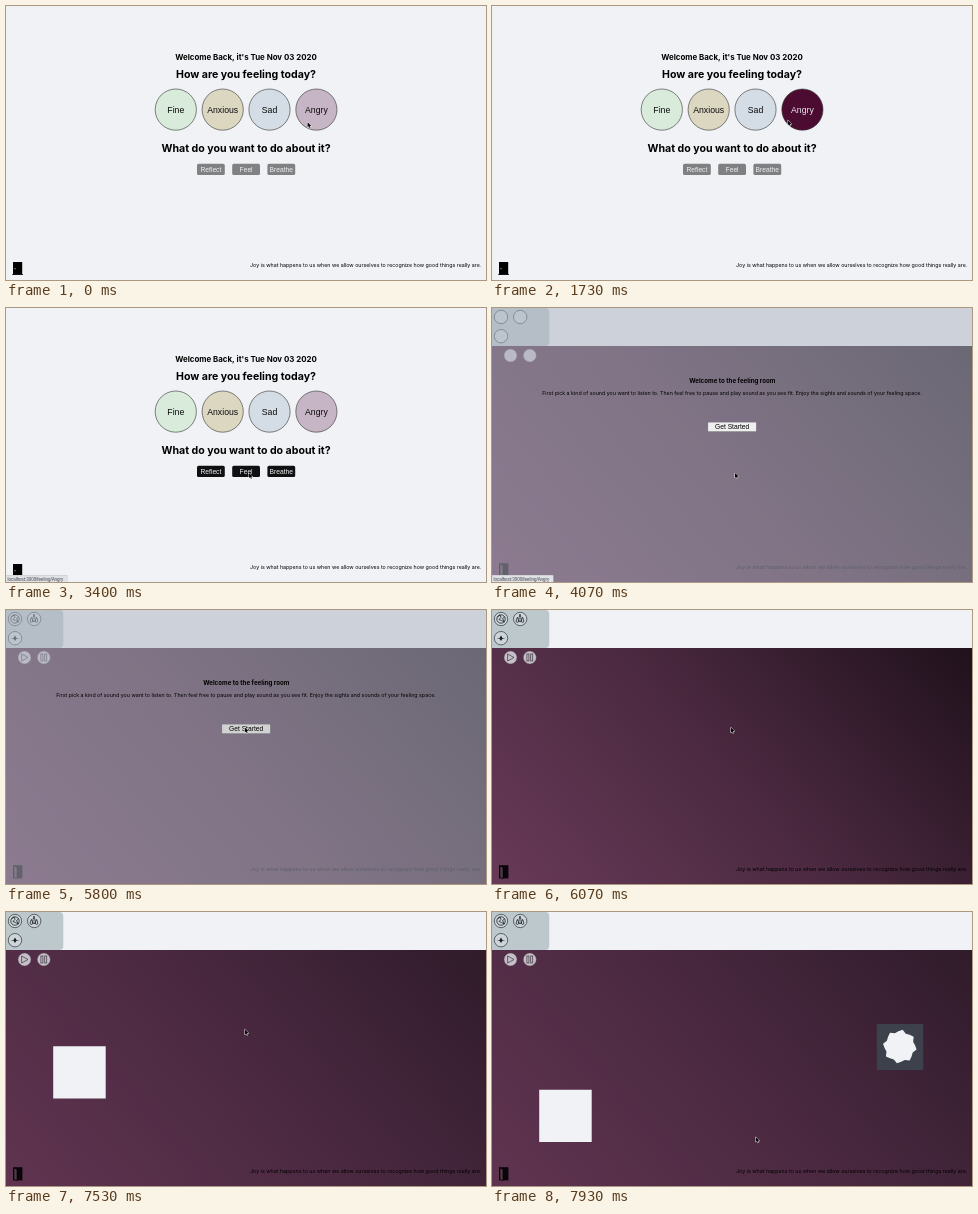
Animation, 480 px wide and 274 px high, one loop 8000 ms. Source, as an HTML page with a canvas:

```html
<!DOCTYPE html>
<html lang="en">
<head>
<meta charset="utf-8">
<title>Feeling room</title>
<style>
html, body { margin: 0; width: 100%; height: 100%; overflow: hidden; background: #f0f2f6; }
canvas { display: block; }
</style>
</head>
<body>
<canvas id="stage" width="480" height="274"></canvas>
<script>
const c = document.getElementById('stage').getContext('2d');
const LOOP = 8000;
const SANS = 'Inter, sans-serif';
const ARIAL = '"Liberation Sans", Arial, sans-serif';
const PAPER = '#f0f2f6';

const clamp = v => Math.max(0, Math.min(1, v));
const ramp = (t, a, b) => clamp((t - a) / (b - a));
const ease = p => p * p * (3 - 2 * p);
const lerp = (a, b, p) => a + (b - a) * p;
const mix = (a, b, p) => `rgb(${a.map((v, i) => Math.round(lerp(v, b[i], p)))})`;

function rect(x, y, w, h, fill, r = 0) {
  c.fillStyle = fill;
  c.beginPath();
  c.roundRect(x, y, w, h, r);
  c.fill();
}

function disc(x, y, r, fill, line, width) {
  c.beginPath();
  c.arc(x, y, r, 0, Math.PI * 2);
  c.fillStyle = fill;
  c.fill();
  c.strokeStyle = line;
  c.lineWidth = width;
  c.stroke();
}

function path(points, closed) {
  c.beginPath();
  points.forEach(([x, y]) => c.lineTo(x, y));
  if (closed) c.closePath();
}

function label(str, x, y, font, fill = '#000', align = 'center') {
  c.font = font;
  c.fillStyle = fill;
  c.textAlign = align;
  c.fillText(str, x, y);
}

// Cursor stops: start, end, x, y
const moves = [
  [70, 530, 295.8, 114.3],
  [2130, 2930, 243, 165],
  [4400, 5200, 238.8, 117.5],
  [7600, 7930, 263.8, 225]
];

function cursor(t) {
  let x = 301.6, y = 116.3;
  for (const [a, b, nx, ny] of moves) {
    const p = ease(ramp(t, a, b));
    x = lerp(x, nx, p);
    y = lerp(y, ny, p);
  }
  c.save();
  c.translate(x, y);
  path([[0, 0], [0, 5], [1.2, 4], [2, 5.8], [2.9, 5.4], [2.1, 3.7], [3.7, 3.6]], true);
  c.lineWidth = 0.9;
  c.strokeStyle = '#fff';
  c.stroke();
  c.fillStyle = '#000';
  c.fill();
  c.restore();
}

function quote() {
  label('Joy is what happens to us when we allow ourselves to recognize how good things really are.',
    475.3, 261, `5.3px ${SANS}`, '#000', 'right');
}

function status() {
  rect(-2, 267, 63.5, 9, '#c3c6ca', 1);
  rect(-2, 267.5, 63, 9, '#dfe2e6', 1);
  label('localhost:3000/feeling/Angry', 1.5, 272.7, `4.45px ${ARIAL}`, '#444', 'left');
}

function home(t) {
  rect(0, 0, 480, 274, PAPER);
  label("Welcome Back, it's Tue Nov 03 2020", 240, 54.2, `bold 7.9px ${SANS}`);
  label('How are you feeling today?', 240, 72.2, `bold 10.6px ${SANS}`);
  label('What do you want to do about it?', 240, 146.2, `bold 10.6px ${SANS}`);

  const angry = t < 1700 ? 0 : 1 - ramp(t, 3050, 3350);
  const moods = [
    ['Fine', 169.8, '#d9ebdb'],
    ['Anxious', 216.7, '#dcd7c1'],
    ['Sad', 263.5, '#d4dde5'],
    ['Angry', 310.4, mix([198, 181, 197], [76, 12, 50], angry)]
  ];
  moods.forEach(([name, x, fill], i) => {
    disc(x, 103.6, 20.6, fill, '#333', 0.6);
    label(name, x, 106.7, `8.7px ${ARIAL}`, i === 3 ? mix([10, 10, 10], [235, 230, 235], angry) : '#0a0a0a');
  });

  const on = ramp(t, 1730, 1930);
  ['Reflect', 'Feel', 'Breathe'].forEach((name, i) => {
    const x = 191 + i * 35.2;
    rect(x, 157.8, 27.8, 11.2, mix([128, 129, 131], [14, 16, 17], on), 1.6);
    label(name, x + 13.9, 165.8, `6.7px ${ARIAL}`, '#f0f0f0');
  });

  rect(7, 256, 9.2, 12.6, '#000');
  rect(6.2, 268.2, 10.8, 0.8, '#000');
  rect(8.5, 262.3, 1, 1, '#ddd');
  quote();
}

function icons() {
  c.strokeStyle = '#1c2226';
  c.fillStyle = '#1c2226';
  c.lineWidth = 0.8;
  // globe
  c.beginPath();
  c.arc(9, 9, 4.2, 0, 7);
  c.stroke();
  path([[5.4, 7], [8, 5], [9, 7.4], [7, 9.5], [9.5, 10.5], [12.5, 12], [10.5, 8.5], [12.6, 7]]);
  c.stroke();
  // drops
  for (const [x, y, h] of [[25.4, 12.4, 5], [28, 11.8, 7.6], [30.6, 12.4, 5]]) {
    c.beginPath();
    c.moveTo(x, y - h);
    c.quadraticCurveTo(x + 2.4, y, x, y);
    c.quadraticCurveTo(x - 2.4, y, x, y - h);
    c.stroke();
  }
  // wave
  path([[4.5, 28.3], [7.5, 28], [9, 25.6], [10.5, 28], [13.5, 28.3], [10.5, 28.8], [9, 31], [7.5, 28.8]], true);
  c.fill();
}

function exitDoor() {
  rect(7, 255.2, 9.4, 13.2, '#0a0508');
  path([[8, 256], [11, 257.4], [11, 268.8], [8, 267.4]], true);
  c.fillStyle = '#55374b';
  c.fill();
  c.strokeStyle = '#000';
  c.lineWidth = 0.6;
  c.stroke();
}

function room(t) {
  const shift = ramp(t, 7070, 7530);
  const g = c.createLinearGradient(50, 330, 430, -10);
  g.addColorStop(0, mix([104, 58, 88], [96, 52, 80], shift));
  g.addColorStop(0.5, mix([75, 41, 64], [75, 41, 65], shift));
  g.addColorStop(1, mix([33, 18, 29], [48, 28, 43], shift));
  rect(0, 0, 480, 274, g);
  rect(0, 0, 480, 38, PAPER);
  rect(0, 0, 57.3, 38, '#bdc8cd', [0, 4, 4, 0]);

  for (const [x, y] of [[9, 9], [28.2, 9], [9, 28.2]]) disc(x, y, 6.7, '#cdd5da', '#2b3438', 0.7);
  for (const x of [18.5, 37.8]) disc(x, 47.5, 6.5, '#c6bfc8', '#55485a', 0.4);
  if (t >= 4130) {
    icons();
    c.strokeStyle = '#4a4450';
    c.lineWidth = 0.8;
    path([[15.6, 44], [22, 47.5], [15.6, 51]], true);
    c.stroke();
    c.strokeRect(34.9, 44, 2, 7);
    c.strokeRect(38.7, 44, 2, 7);
  }
  exitDoor();
  quote();
}

function intro(t) {
  rect(0, 0, 480, 274, 'rgba(174,182,194,0.53)');
  label('Welcome to the feeling room', 240.3, 74.6, `bold 6.2px ${SANS}`);
  label('First pick a kind of sound you want to listen to. Then feel free to pause and play sound as you see fit. ' +
    'Enjoy the sights and sounds of your feeling space.', 240, 86.6, `5.3px ${SANS}`);
  const down = t >= 5800;
  rect(215.8, 114.2, 48.6, 9.4, '#8a8a90', 0.6);
  rect(216.1, 114.5, 48, 8.8, down ? '#d2d2d2' : '#efefef', 0.5);
  label('Get Started', 240.1, 121.2, `6.7px ${ARIAL}`);
}

function shapes(t) {
  if (t >= 7070) rect(47.2, 134.2 + (t - 7530) * 0.1085, 52.5, 52.2, PAPER);
  if (t < 7900) return;
  rect(384.8, 112, 46.4, 46, '#3d414b');
  const n = 24;
  path(Array.from({ length: n }, (_, i) => {
    const a = i * Math.PI * 2 / n - 1.4;
    const r = [17, 14.2, 15.3][i % 3];
    return [407.8 + r * Math.cos(a), 134.6 + r * Math.sin(a)];
  }), true);
  c.fillStyle = PAPER;
  c.fill();
}

function draw(t) {
  if (t < 4050) {
    home(t);
  } else {
    room(t);
    if (t < 6050) intro(t);
    shapes(t);
  }
  if (t >= 3000 && t < 4450) status();
  cursor(t);
}

function tick() {
  draw(performance.now() % LOOP);
  requestAnimationFrame(tick);
}
tick();
</script>
</body>
</html>
```
